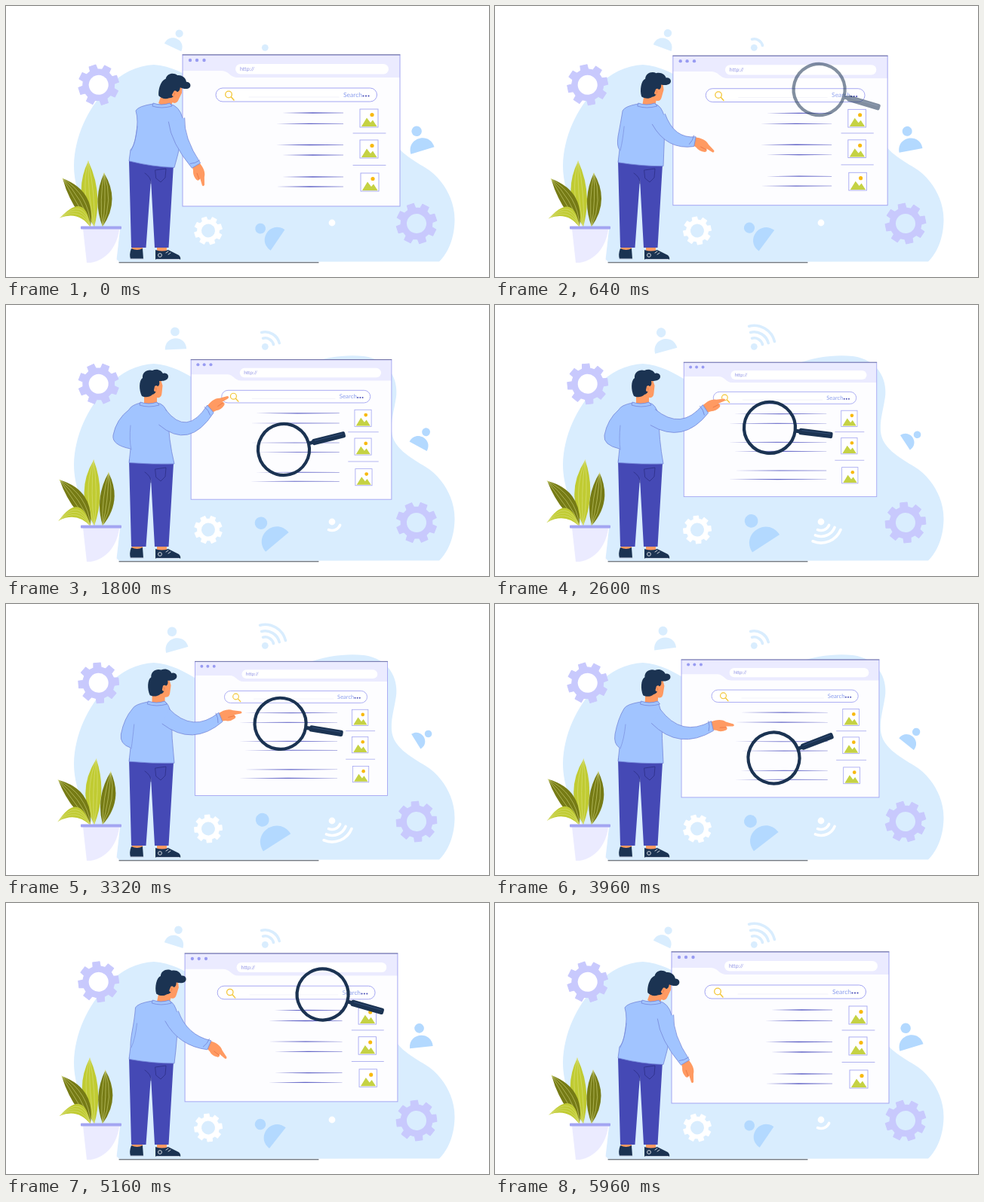
An HTML page that plays this animation: 640 by 360 pixels, repeating every 6000 ms.

```html
<!DOCTYPE html>
<html lang="en">
<head>
<meta charset="utf-8">
<title>Web search</title>
<style>
html, body { margin: 0; width: 100%; height: 100%; overflow: hidden; background: #fff; }
svg { display: block; width: 640px; height: 360px; }
text { font-family: Lato, "Open Sans", sans-serif; text-rendering: geometricPrecision; }
</style>
</head>
<body>
<svg id="stage" viewBox="0 0 640 360"></svg>
<script>
const LOOP = 6000;
const SKY = '#d9edfe', BLUE = '#b3d9ff', LILAC = '#c8c9fd', PALE = '#ebebff', EDGE = '#a3a5f2';
const NAVY = '#1b3352', SKIN = '#ff9a62', SHIRT = '#a1c4ff', SEAM = '#7587d8', JEANS = '#4549b5';
const LIME = '#c0cb32', OLIVE = '#767b15';

const path = (d, fill, extra = '') => `<path d="${d}" fill="${fill}" ${extra}/>`;
const line = (d, color, w = 1) => path(d, 'none', `stroke="${color}" stroke-width="${w}" stroke-linecap="round"`);
const dot = (x, y, r, fill) => `<circle cx="${x}" cy="${y}" r="${r}" fill="${fill}"/>`;
const box = (x, y, w, h, fill, extra = '') => `<rect x="${x}" y="${y}" width="${w}" height="${h}" fill="${fill}" ${extra}/>`;
const group = (transform, body, extra = '') => `<g transform="${transform}" ${extra}>${body}</g>`;
const place = (x, y, a, k, body) => group(`translate(${x} ${y}) rotate(${a}) scale(${k})`, body);

// Rows are [time, ...values]; smooth interpolation with resting ends.
function track(rows, t) {
  const j = rows.findIndex(r => r[0] > t), i = j - 1;
  const a = rows[i], b = rows[j], h = b[0] - a[0], u = (t - a[0]) / h;
  const slope = (k, c) => rows[k - 1] && rows[k + 1]
    ? (rows[k + 1][c] - rows[k - 1][c]) / (rows[k + 1][0] - rows[k - 1][0]) : 0;
  return a.slice(1).map((v, n) => {
    const c = n + 1, e = u * u * (3 - 2 * u);
    return v + (b[c] - v) * e
      + h * u * (1 - u) * ((1 - u) * slope(i, c) - u * slope(j, c));
  });
}

// Rows are [time, value]; the last one reached holds.
const step = (rows, t) => rows.filter(r => r[0] <= t).pop()[1];

function gear(x, y, r, hole, turn, color, back) {
  const pts = [];
  for (let i = 0; i < 8; i++)
    for (const [da, k] of [[-14, .78], [-10, 1], [10, 1], [14, .78]]) {
      const a = (i * 45 + da) * Math.PI / 180;
      pts.push((r * k * Math.cos(a)).toFixed(2) + ',' + (r * k * Math.sin(a)).toFixed(2));
    }
  return place(x, y, turn, 1,
    path('M' + pts.join('L') + 'Z', color, `stroke="${color}" stroke-linejoin="round"`) + dot(0, 0, hole, back));
}

const person = (x, y, a, k, color) => place(x, y, a, k,
  dot(0, -24, 6, color) + path('M-14.5 0C-14.5 -20 14.5 -20 14.5 0Z', color));

function wifi(x, y, from, to, count, color) {
  const at = (r, a) => `${x + r * Math.cos(a * Math.PI / 180)} ${y + r * Math.sin(a * Math.PI / 180)}`;
  return dot(x, y, 4.4, color) + [11.5, 19.5, 28].slice(0, count).map(r =>
    line(`M${at(r, from)}A${r} ${r} 0 0 1 ${at(r, to)}`, color, 3.6)).join('');
}

function leaf(bx, by, tx, ty, bend, w, color) {
  const dx = tx - bx, dy = ty - by, len = Math.hypot(dx, dy);
  const ctl = o => `Q${(bx + tx) / 2 - dy / len * (bend + o)} ${(by + ty) / 2 + dx / len * (bend + o)}`;
  const vein = o => line(`M${bx} ${by}${ctl(o)} ${tx} ${ty}`, '#dfe58c', .5);
  return path(`M${bx} ${by}${ctl(w)} ${tx} ${ty}${ctl(-w)} ${bx} ${by}Z`, color)
    + [-w / 2, 0, w / 2].map(vein).join('');
}

function thumb(x, y) {
  return group(`translate(${x} ${y})`,
    box(0, 0, 24, 24, '#fff', `stroke="${EDGE}" stroke-width=".9"`)
    + path('M2 23L9 11.5L14 18L17 14.5L22.5 23Z', '#c5d243') + dot(16, 7.5, 2.6, '#f8b90f'));
}

function browser(p) {
  const k = 1 - .118 * p, left = 362 - 60 * p;
  const rule = (y, dx) => {
    const l = left + dx, m = (l + 447) / 2;
    return path(`M${l} ${y}L${m} ${y - .65}L447 ${y - .2}V${y + .2}L${m} ${y + .65}Z`, '#6062c6');
  };
  const body = box(234, 65, 288, 201, '#fdfdff')
    + path('M234 65H522V95H306C297 95 295 86 286 86H234Z', PALE)
    + [244, 253, 262.5].map(x => dot(x, 72, 2.2, '#999cf2')).join('')
    + box(304, 77, 203, 13.5, '#fff', 'rx="6.7"')
    + `<text x="310" y="86" font-size="7" fill="#8f92e4">http://</text>`
    + box(278, 109, 213.5, 18, '#fff', `rx="9" stroke="${EDGE}"`)
    + `<circle cx="295" cy="117.5" r="4.3" fill="none" stroke="#f3c637" stroke-width="1.3"/>`
    + line('M298.5 121L302 125', '#f3c637', 1.5)
    + line('M322 121H441', '#e9e9f6', .6)
    + `<text x="447" y="120.8" font-size="8.5" fill="#8a9ded">Search</text>`
    + [473.5, 477, 480.5].map(x => dot(x, 119.5, 1.1, '#4b50b8')).join('')
    + rule(142, 4) + rule(156.3, -4) + rule(184.5, -4) + rule(198, 4) + rule(227, 4) + rule(240, -4)
    + thumb(469, 137) + thumb(469, 178) + thumb(470, 222)
    + line('M460 169H503M460 211.5H503', '#b0b2f0', 1)
    + box(234, 65, 288, 201, 'none', `stroke="${EDGE}"`)
    + line('M234 64.8H522', '#565a86', .8);
  return group(`translate(378 165.4) scale(${k}) translate(-378 -165.4)`, body);
}

function plant(p) {
  return leaf(117, 293, 109 + 11 * p, 206, -5, 21, LIME)
    + leaf(128, 293, 130 + 9 * p, 222 + p, 4, 19, OLIVE)
    + leaf(112, 293, 75 - 6 * p, 229 + 5 * p, 10, 20, OLIVE)
    + leaf(112, 294, 72 - 3 * p, 281 + 8 * p, 30, 14, LIME)
    + path('M102 296H151L146 341H107Z', PALE)
    + path('M151 297L146 341H112C133 338 147 320 150 297Z', '#fff')
    + box(99, 292.5, 54, 4, EDGE, 'rx="1"');
}

function legs() {
  return path('M167 317H181V326H167ZM200 317H213V327H200Z', SKIN)
    + path('M166 322Q174 326 181 322L182 336H165Q163 330 166 322Z', NAVY)
    + path('M198 324Q207 327 215 324L229 331Q232 334 231 337H198Z', NAVY)
    + line('M165 336H182M199 336.5H230', '#c3cbdc', 1.2)
    + `<circle cx="204" cy="331" r="2.4" fill="none" stroke="#fff" stroke-width=".8"/>`
    + line('M212 328L215 326M215 330L218 328', '#fff', .8)
    + path('M163 205L222 210L215.5 321H197L192 230L185.5 321H166Z', JEANS)
    + line('M192 236Q193 228 184 222M198 218L212 216L211 228L205 234L199 229Z', '#2c2f86', .8);
}

const POSES = [
  // time, head x y turn, shoulders left right y, back elbow, elbow x y, wrist x y, hand angle
  [0, 221, 109, 20, 172, 231, 140, 172, 233, 180, 252, 212, 70],
  [1120, 200, 105, 0, 166, 213, 138, 153, 240, 169, 276, 149, -14],
  [1800, 194, 105, 0, 163, 212, 138, 142, 240, 164, 271, 138, -34],
  [2600, 198, 105, 0, 164, 214, 138, 145, 246, 160, 279, 138, -26],
  [3960, 211, 106, 3, 171, 218, 138, 159, 248, 171, 288, 162, -2],
  [4520, 211, 106, 3, 171, 218, 138, 161, 246, 172, 287, 165, 4]
];
POSES.push([LOOP, ...POSES[0].slice(1)]);

function arm(sx, sy, ex, ey, wx, wy) {
  const offset = (x, y, dx, dy, r) => {
    const len = Math.hypot(dx, dy);
    return `${x - dy / len * r} ${y + dx / len * r}`;
  };
  const cx = 2 * ex - (sx + wx) / 2, cy = 2 * ey - (sy + wy) / 2;
  const s = r => offset(sx, sy, ex - sx, ey - sy, r);
  const e = r => offset(cx, cy, wx - sx, wy - sy, r);
  const w = r => offset(wx, wy, wx - ex, wy - ey, r);
  return path(`M${s(-11)}Q${e(-9)} ${w(-6.5)}L${w(6.5)}Q${e(9)} ${s(11)}`, SHIRT, `stroke="${SEAM}" stroke-width=".8"`);
}

function man(t) {
  const [hx, hy, turn, lx, rx, ry, back, ex, ey, wx, wy, hand] = track(POSES, t);
  const nx = hx - 5 - turn * .5, tilt = turn * .18;
  const seam = `stroke="${SEAM}" stroke-width=".8"`;
  const head = path('M-11 10V25Q-3 29 6 25L6 18Q12 19 12.5 12L13.5 2L11 -6L-5 -2Z', SKIN)
    + path('M-14 16C-18 8 -18 -5 -13 -8C-14 -16 -6 -20 0 -18C6 -21 12 -18 14 -14C19 -16 23 -11 20 -7C17 -4 13 -4 9 -4C10 0 9 3 5 4C6 9 4 13 0 14C-4 18 -10 18 -14 16Z', NAVY)
    + path('M3 3C7 0 9 5 6 9C4 11 2 10 2 8Z', SKIN) + line('M4 5Q6 5 5 8', '#e8713f', .7);
  const torso = path(`M${lx} 139Q${lx + 3} 133 ${nx - 11} 130Q${nx} 133 ${nx + 11} 130Q${rx - 1} ${ry - 7} ${rx + 3} ${ry + 9}Q${rx + 3} 178 223 ${211 + tilt}Q195 ${212 + tilt / 2} 163 ${209.5 - tilt}L165 191Q${back - 2} 186 ${back} 173Q${back + 4} 152 ${lx} 139Z`, SHIRT, seam)
    + line(`M${lx + 2} 160Q${lx} 180 166 192`, SEAM, .6)
    + path(`M${nx - 11} 129Q${nx} 133 ${nx + 11} 129L${nx + 14} 133Q${nx} 137 ${nx - 12} 133Z`, SHIRT, seam);
  const fist = path('M-3 -5C5 -8 12 -9 18 -5L28 -1.5Q30 1 27 1.5L18 1Q21 4 18 6Q11 9 5 6L-3 5Z', SKIN)
    + line('M10 2.5L18 2.5', '#e8713f', .7);
  return legs() + place(hx, hy, turn, 1, head) + torso
    + place(wx, wy, hand, 1, fist)
    + arm(rx - 5, ry + 11, ex, ey, wx, wy)
    + place(wx, wy, hand, 1, line('M-5 -6.5Q-3 0 -5 6.5', SEAM, .8));
}

const LENS = [
  [0, 452, 84, 18], [500, 436, 104, 17], [1120, 404, 140, 12], [1480, 380, 180, -8],
  [1800, 368, 192, -14], [2040, 369.5, 204.5, -21], [2600, 364, 163, 7], [3001, 363, 150, 12]
];

function lens(t) {
  const m = Math.min(t, LOOP - t);
  const [x, y, a] = track(LENS, m);
  const show = Math.max(0, Math.min(1, (m - 450) / 350));
  const body = `<circle r="34" fill="#fff" fill-opacity=".15" stroke="${NAVY}" stroke-width="4.2"/>`
    + box(35, -2.5, 8, 5, NAVY) + box(39, -4.2, 45, 8.4, NAVY, 'rx="2.5"')
    + line('M43 -1.5H80', '#35507a', .8);
  return group(`translate(${x} ${y}) rotate(${a})`, body, `opacity="${show}"`);
}

const TOP_WAVES = [[0, 0], [400, 1], [900, 2], [2200, 3], [3500, 2], [4300, 1], [5000, 2], [5500, 3]];
const LOW_WAVES = [[0, 0], [700, 1], [1950, 2], [2400, 3], [3500, 2], [4250, 1], [4900, 0], [5500, 1]];

function scene(t) {
  const p = (1 - Math.cos(2 * Math.PI * t / LOOP)) / 2, turn = 60 * p - 18;
  return path('M150 340C128 318 90 262 90 212C91 174 107 138 135 108C152 89 174 79 196 78C222 80 240 92 262 105C300 126 350 100 395 80C425 68 452 66 474 68C505 72 520 96 517 122C514 142 510 152 511 168C513 190 535 202 556 215C580 230 595 258 594.5 285C594 310 585 329 574 339.5Z', SKY)
    + line('M150 340.8H414', '#27313f', .9)
    + person(221 + 6 * p, 55 + 6 * p, 25 - 42 * p, .85 + .2 * p, SKY)
    + person(552 - 9 * p, 192 - 10 * p * p, -17 + 55 * p + 23 * p * p, 1.12 - .33 * p, BLUE)
    + person(360 - p, 311 + 6 * p, -56 + 24 * p, 1.15 + .35 * p, BLUE)
    + wifi(343.3, 55.3, -104, -14, step(TOP_WAVES, t), SKY)
    + wifi(432, 288, 22, 113, step(LOW_WAVES, t), '#fff')
    + gear(122.7, 104.8, 27, 13, turn, LILAC, '#fff')
    + gear(544, 289, 27, 13, turn, LILAC, SKY)
    + gear(268, 298.5, 18.5, 9, turn, '#fff', SKY)
    + browser(p) + plant(p) + man(t) + lens(t);
}

const stage = document.getElementById('stage');
const start = performance.now();
function draw() {
  stage.innerHTML = scene((performance.now() - start) % LOOP);
  requestAnimationFrame(draw);
}
draw();
</script>
</body>
</html>
```
